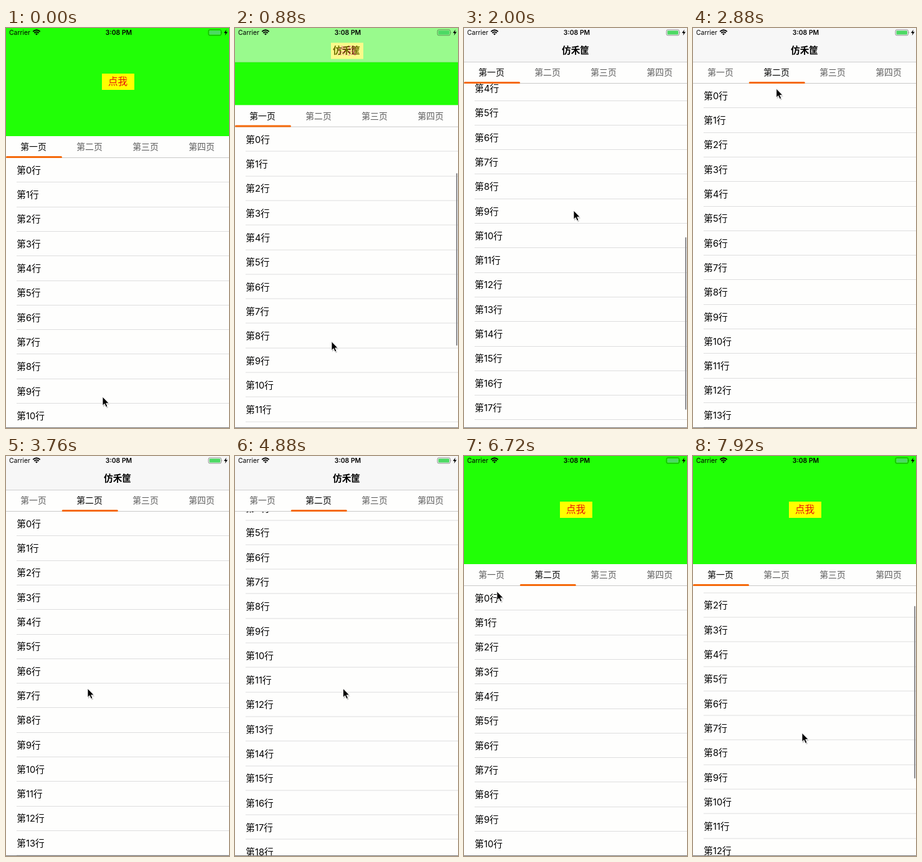
An HTML page for the animation above (8000 ms loop, 358x640 px).

```html
<!DOCTYPE html>
<html lang="zh-CN">
<head>
<meta charset="utf-8">
<style>
  html, body { margin: 0; width: 100%; height: 100%; overflow: hidden; background: #fefefd; }
  body { font-family: Inter, "Noto Sans CJK SC", "Noto Sans CJK", sans-serif; color: #000; }
  #stage { position: absolute; left: 0; top: 0; width: 358px; height: 640px; overflow: hidden; background: #fefefd; }
  #stage div, #stage svg { position: absolute; }
  .page { left: 0; top: 0; width: 358px; height: 640px; }
  .list { left: 0; top: 208px; width: 358px; }
  .row { left: 17.3px; width: 340.7px; height: 39.3px; line-height: 39.3px; font-size: 14.7px; white-space: nowrap; }
  .rule { left: 17px; right: 0; height: 1px; background: #dedede; }
  .bar { left: 355px; top: 211px; width: 2.4px; height: 276px; border-radius: 2px; background: #8b8b8e; }
  #top { left: 0; top: 0; width: 358px; height: 208px; }
  #hero { left: 0; top: 0; width: 358px; height: 173px; background: #21ff06; }
  #btn { left: 153.5px; top: 72.5px; width: 52px; height: 26px; line-height: 26px; text-align: center; font-size: 15.6px; background: #ff0; color: #e8130c; }
  #tabs { left: 0; top: 173px; width: 358px; height: 34px; background: #fefefd; border-bottom: 1px solid #c9c9c9; }
  .tab { top: 0; width: 90px; height: 34px; line-height: 34px; text-align: center; font-size: 13.9px; }
  #mark { left: 0; top: 32px; width: 89.5px; height: 3px; border-radius: 1.5px; background: #f56a0c; }
  #nav { left: 0; top: 0; width: 358px; height: 54px; background: #f7f7f7; border-bottom: 1px solid #cfcfcf; }
  #title { left: 0; top: 26px; width: 358px; line-height: 21px; text-align: center; font-size: 14.7px; font-weight: 600; }
  .status { top: 1px; line-height: 13px; font-size: 10.4px; white-space: nowrap; }
  #edge { left: 0; top: 639px; width: 358px; height: 1px; background: #777; }
</style>
</head>
<body>
<div id="stage">
  <div class="page"><div class="list"></div><div class="bar"></div></div>
  <div class="page"><div class="list"></div><div class="bar"></div></div>
  <div id="top">
    <div id="hero"><div id="btn">点我</div></div>
    <div id="tabs"><div id="mark"></div></div>
  </div>
  <div id="nav"><div id="title">仿禾筐</div></div>
  <div class="status" style="left:5px">Carrier</div>
  <div class="status" style="left:131px;width:100px;text-align:center;font-weight:600">3:08 PM</div>
  <svg width="358" height="16" style="left:0;top:0">
    <g fill="none" stroke="#000" stroke-width="1.8">
      <path d="M43.3 5.8Q49 .8 54.7 5.8M45.3 8Q49 4.8 52.7 8"/>
      <path d="M47 9.2Q49 7.8 51 9.2L49 11.4Z" fill="#000" stroke="none"/>
    </g>
    <rect x="325" y="2.8" width="20.5" height="9" rx="2.2" fill="none" stroke="#000" stroke-opacity=".45" stroke-width=".9"/>
    <rect x="326.5" y="4.2" width="17.5" height="6.2" rx="1" fill="#4cd964"/>
    <path d="M346.6 5.7q1.4 1.6 0 3.2z" fill="#000" fill-opacity=".45"/>
    <path d="M353.8 2.6L349.9 8H352.5L351.6 12L355.8 6.3H353Z"/>
  </svg>
  <div id="edge"></div>
  <svg id="cursor" width="18" height="24" viewBox="-2 -2 18 24" style="left:-2px;top:-2px">
    <path d="M1 2.5V16.5L4.4 13.4L6.8 18.4L9.2 17.3L6.9 12.4H11.4Z" fill="#000" opacity=".2"/>
    <path d="M0 0V14.2L3.2 11.3L5.5 16.5L8 15.4L5.7 10.4H10.2Z" fill="#000" stroke="#fff" stroke-width=".9"/>
  </svg>
</div>
<script>
const LOOP = 8000, ROW = 39.3, ROWS = 20, FOLD = 119;
const $ = id => document.getElementById(id);
const pages = [...document.querySelectorAll('.page')];

function add(parent, cls, text, style) {
  const el = document.createElement('div');
  el.className = cls;
  el.textContent = text;
  Object.assign(el.style, style);
  parent.append(el);
  return el;
}

for (const page of pages) {
  const list = page.firstElementChild;
  for (let i = 0; i < ROWS; i++) {
    add(list, 'row', `第${i}行`, { top: i * ROW + 0.8 + 'px' });
    add(list, 'rule', '', { top: Math.round((i + 1) * ROW - 1) + 'px' });
  }
}
const tabs = [...'一二三四'].map((n, i) =>
  add($('tabs'), 'tab', `第${n}页`, { left: i * 90 - 1 + 'px' }));
$('tabs').append($('mark'));

const ease = {
  lin: u => u,
  out: u => 1 - (1 - u) ** 3,
  io: u => u * u * (3 - 2 * u)
};

// Steps are [time, value, easing into it]
const scroll = [
  [[0, 0], [420, 0], [880, 49, 'lin'], [1120, 151, 'lin'], [1380, 259, 'lin'], [1900, 288, 'out'],
   [7420, 288], [7920, 67.6, 'io'], [8000, 58, 'lin']],
  [[0, FOLD], [3990, FOLD], [4240, 262, 'lin'], [4560, 301.5, 'out'],
   [4910, 301.5], [5090, 200, 'lin'], [5340, 0, 'out']]
];
const barFade = [
  [[0, 0], [420, 0], [440, 1], [2200, 1], [2480, 0], [7420, 0], [7440, 1]],
  [[0, 0], [3990, 0], [4010, 1], [4580, 1], [4840, 0], [4910, 0], [4930, 1], [5480, 1], [5760, 0]]
];
const CLICK = [2520, 6960];
const slide = [[0, 0], [CLICK[0], 0], [CLICK[0] + 300, 1, 'io'], [CLICK[1], 1], [CLICK[1] + 300, 0, 'io']];
const cx = [[0, 155], [880, 155], [1380, 176, 'io'], [2000, 176], [2440, 134, 'io'], [2700, 134],
  [3760, 131, 'io'], [4240, 168, 'io'], [4880, 173.5, 'io'], [5360, 173.5], [6720, 53, 'io'],
  [6900, 44, 'out'], [7060, 44], [7400, 172, 'io'], [7920, 175, 'lin']];
const cy = [[0, 590], [100, 590], [420, 551, 'lin'], [880, 502, 'lin'], [1120, 400, 'lin'], [1380, 292, 'lin'],
  [2000, 292], [2440, 74, 'io'], [2700, 74], [3760, 372, 'io'], [3960, 440, 'io'], [4240, 297, 'io'],
  [4700, 372, 'io'], [4910, 372], [5090, 474, 'lin'], [5500, 474], [6720, 217, 'io'],
  [6900, 191, 'out'], [7060, 191], [7400, 230, 'io'], [7920, 443, 'io'], [8000, 453, 'lin']];

function at(steps, t) {
  for (let i = 1; i < steps.length; i++) {
    const [t1, b, e = 'lin'] = steps[i];
    if (t < t1) {
      const [t0, a] = steps[i - 1];
      return a + (b - a) * ease[e]((t - t0) / (t1 - t0));
    }
  }
  return steps[steps.length - 1][1];
}

const move = (el, x, y) => { el.style.transform = `translate(${x}px,${y}px)`; };

function draw(t) {
  const pos = at(slide, t);
  const active = t >= CLICK[0] && t < CLICK[1] ? 1 : 0;
  pages.forEach((page, i) => {
    const s = at(scroll[i], t);
    const [list, bar] = page.children;
    move(page, (i - pos) * 358, 0);
    move(list, 0, -s);
    move(bar, 0, s * 0.43);
    bar.style.opacity = at(barFade[i], t);
  });
  // The header follows page one, then page two, and stays open afterwards
  const lead = t < CLICK[0] ? at(scroll[0], t) : at(scroll[1], t);
  const fold = Math.min(lead, FOLD);
  move($('top'), 0, -fold);
  $('nav').style.opacity = Math.min(1, fold / 88);
  tabs.forEach((tab, i) => { tab.style.color = i === active ? '#000' : '#5c5c5c'; });
  move($('mark'), pos * 89.8, 0);
  move($('cursor'), at(cx, t), at(cy, t));
}

const start = performance.now();
function tick() {
  draw((performance.now() - start) % LOOP);
  requestAnimationFrame(tick);
}
draw(0);
requestAnimationFrame(tick);
</script>
</body>
</html>
```
